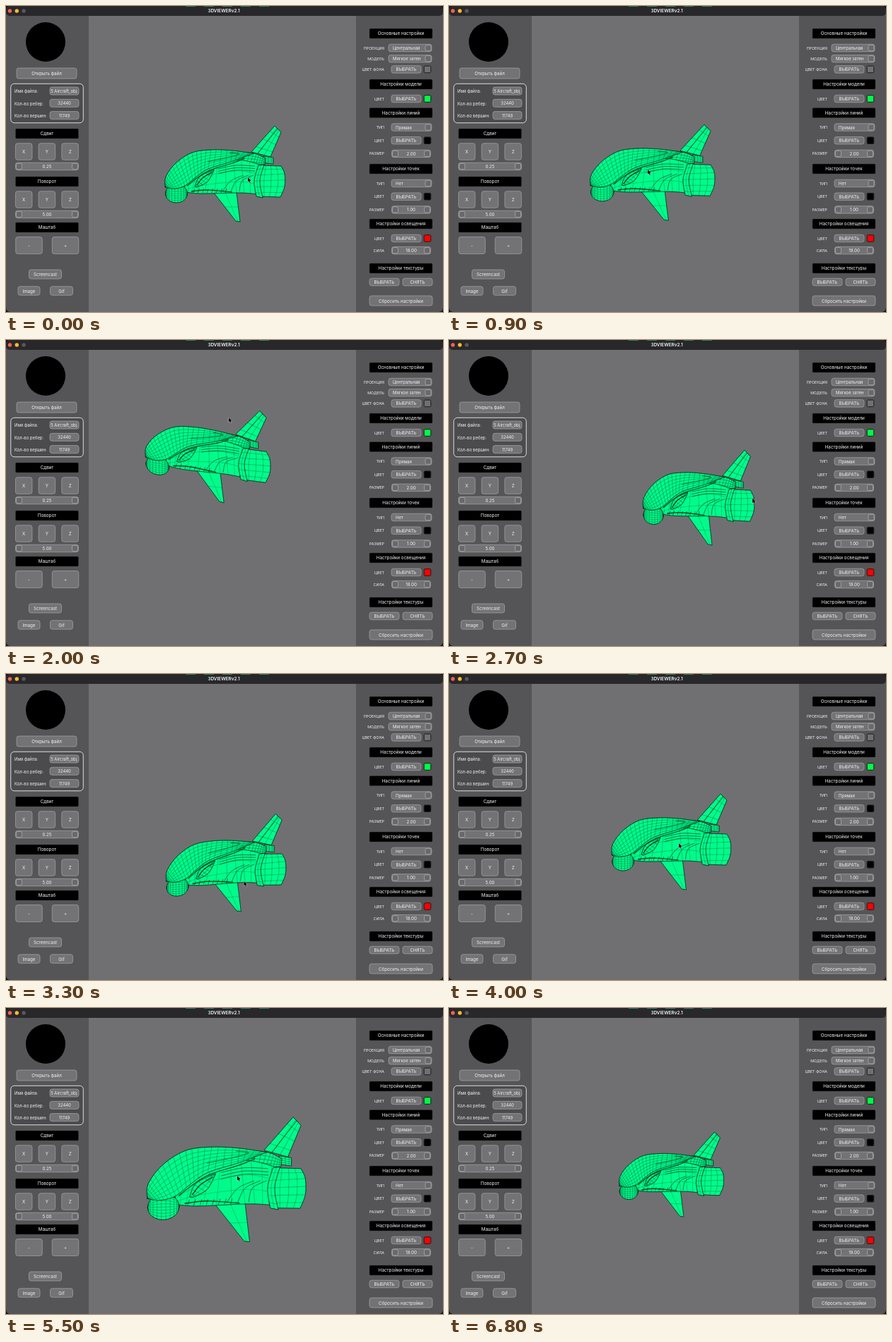
These frames come from a looping animation (618 by 434 pixels, 7.5 s). An HTML page with a canvas:

```html
<!DOCTYPE html>
<html lang="ru">
<head>
<meta charset="utf-8">
<title>3DVIEWERv2.1</title>
<style>
html, body { margin: 0; width: 100%; height: 100%; overflow: hidden; background: #111; }
svg, canvas { position: absolute; left: 0; top: 0; width: 618px; height: 434px; }
text { font-family: Inter, Roboto, sans-serif; fill: #f2f2f2; dominant-baseline: central; }
</style>
</head>
<body>
<svg id="ui" viewBox="0 0 618 434"></svg>
<canvas id="view"></canvas>
<script>
// ---- Window and panels: boxes are placed by their centre ----
const parts = [];
const box = (cx, cy, w, h, fill, stroke = 'none', r = 0, line = .7) => parts.push(
  `<rect x="${cx - w / 2}" y="${cy - h / 2}" width="${w}" height="${h}" rx="${r}" fill="${fill}" stroke="${stroke}" stroke-width="${line}"/>`);
const dot = (x, y, r, fill) => parts.push(`<circle cx="${x}" cy="${y}" r="${r}" fill="${fill}"/>`);
const text = (s, x, y, size = 6.3, anchor = 'middle', weight = 400) => parts.push(
  `<text x="${x}" y="${y}" font-size="${size}" text-anchor="${anchor}" font-weight="${weight}">${s}</text>`);

function button(s, cx, cy, w = 42, h = 10.5, size = 6.2) {
  box(cx, cy, w, h, '#737275', '#a6a5a8', 3);
  text(s, cx, cy, size);
}
function header(s, cx, cy) {
  box(cx, cy, 89, 14, '#000', '#39383a', 1.5, .5);
  text(s, cx, cy);
}
const knob = (cx, cy) => box(cx, cy, 8, 8.2, '#69686b', '#bdbcbf', 1.8, .6);
function spin(s, cx, cy, w = 55) {
  button(s, cx, cy, w);
  [-1, 1].forEach(side => knob(cx + side * (w / 2 - 5), cy));
}
function combo(s, cy, w) {
  const cx = 602 - w / 2;
  button('', cx, cy, w);
  text(s, cx - w / 2 + 6, cy, 6, 'start');
  knob(597, cy);
}
function swatch(cy, color) {
  button('ВЫБРАТЬ', 566, cy);
  box(596, cy, 9.6, 9.6, color, '#1c1c1d', 1.5, 1);
}

box(309, 217, 618, 434, '#555457', 'none', 6);
box(306, 224, 378, 420, '#707072');
box(309, 7, 618, 14, '#282729', 'none', 5);
['#ff5f57', '#febc2e', '#59585a'].forEach((color, i) => dot(5.5 + 9.8 * i, 7, 2.7, color));
text('3DVIEWERv2.1', 308, 7, 6.4, 'middle', 600);
parts.push('<path d="M254 .5H375" stroke="#2d7d5c" stroke-dasharray="14 12"/>');

dot(56, 51, 28, '#000');
button('Открыть файл', 57.5, 95.5, 85, 15);
box(58, 138, 102.5, 55.5, '#4b4a4c', '#dddcdf', 5, 1);
[['Имя файла:', '5 Aircraft_obj.'], ['Кол-во ребер:', '32440'], ['Кол-во вершин:', '11749']]
  .forEach(([name, value], i) => {
    text(name, 12, 120.5 + 17.7 * i, 5.9, 'start');
    button(value, 82.5, 120.5 + 17.3 * i, 41, 11, 5.9);
  });
[['Сдвиг', 181, '0.25'], ['Поворот', 249, '5.00']].forEach(([name, y, value]) => {
  header(name, 58, y);
  [...'XYZ'].forEach((axis, i) => button(axis, 25.2 + 32.7 * i, y + 25.5, 23.5, 23.5));
  spin(value, 58, y + 46.5, 89);
});
header('Маштаб', 58, 314);
[...'-+'].forEach((sign, i) => button(sign, 32.5 + 51.5 * i, 339.5, 37.5, 24));
button('Screencast', 55.5, 380.5, 46, 13);
button('Image', 32.5, 404, 31, 12.5);
button('Gif', 78.5, 404, 32, 12.5);

// Rows are [label, kind, value]
function section(title, y, rows, pitch = 18.7) {
  header(title, 558.5, y);
  rows.forEach(([label, kind, value], i) => {
    const cy = y + 20.5 + pitch * i;
    text(label, 535, cy, 5.3, 'end');
    kind(value, cy);
  });
}
const wide = (s, y) => combo(s, y, 61), narrow = (s, y) => combo(s, y, 57);
const color = (c, y) => swatch(y, c), number = (s, y) => spin(s, 573, y);
section('Основные настройки', 39, [['ПРОЕКЦИЯ', wide, 'Центральная'],
  ['МОДЕЛЬ', wide, 'Мягкое затен'], ['ЦВЕТ ФОНА', color, '#707072']], 15.2);
section('Настройки модели', 111, [['ЦВЕТ', color, '#00fa46']]);
section('Настройки линий', 151.5, [['ТИП', narrow, 'Прямая'], ['ЦВЕТ', color, '#000'], ['РАЗМЕР', number, '2.00']]);
section('Настройки точек', 231, [['ТИП', narrow, 'Нет'], ['ЦВЕТ', color, '#000'], ['РАЗМЕР', number, '1.00']]);
section('Настройки освещения', 309, [['ЦВЕТ', color, '#f00'], ['СИЛА', number, '18.00']], 17.2);
section('Настройки текстуры', 372, []);
button('ВЫБРАТЬ', 535, 391.5);
button('СНЯТЬ', 582, 391.5);
button('Сбросить настройки', 558.5, 418, 89, 14);
document.getElementById('ui').innerHTML = parts.join('');

// ---- Motion ----
const mix = (a, b, u) => a + (b - a) * u;
const ramp = (t, from, to) => Math.max(0, Math.min(1, (t - from) / (to - from)));
const range = n => Array.from({ length: n + 1 }, (_, i) => i / n);

// Catmull-Rom curve through a flat list of x, y
function curve(p, u) {
  const last = p.length / 2 - 1, i = Math.min(last - 1, Math.floor(u * last)), v = u * last - i;
  return [0, 1].map(axis => {
    const [a, b, c, d] = [-1, 0, 1, 2].map(o => p[2 * Math.max(0, Math.min(last, i + o)) + axis]);
    return b + .5 * v * (c - a + v * (2 * a - 5 * b + 4 * c - d + v * (3 * (b - c) + d - a)));
  });
}
// The drag, one point every 400 ms
const shiftPath = [0, 0, -14, -1, -34, -8, -36, -42, -21, -69, 14, -60, 40, 0, 10, 26, -20, 25, 4, 0, 4, 0];
const pointerPath = [342, 243, 295, 235, 245, 215, 262, 150, 315, 110, 385, 145, 432, 248, 360, 295, 275, 270, 325, 240, 327, 238];
const zoomAt = t => 1 + .83 * ramp(t, 4400, 4900) - .55 * ramp(t, 5200, 5500)
  - .28 * ramp(t, 5800, 6300) - .11 * ramp(t, 6400, 6800);

// ---- Model ----
const canvas = document.getElementById('view'), ctx = canvas.getContext('2d');
const dpr = window.devicePixelRatio || 1;
canvas.width = 618 * dpr;
canvas.height = 434 * dpr;

let shift, zoom;
// The nose lies nearer to the camera than the tail.
function project([x, y]) {
  const near = (385 - x) * .0015, k = zoom / (1 - zoom * near);
  return [306 + k * ((x - 306) * (1 - near) + shift[0]), 224 + k * ((y - 224) * (1 - near) + shift[1])];
}
const trace = pts => pts.forEach((p, i) => ctx[i ? 'lineTo' : 'moveTo'](...project(p)));
function stroke(width, ink) {
  ctx.lineWidth = width;
  ctx.strokeStyle = `rgba(0,25,12,${ink})`;
  ctx.stroke();
}

// Quad mesh between two edges
function mesh(a, b, across, down, ink = .55) {
  const at = (u, v) => {
    const p = curve(a, u), q = curve(b, u);
    return [mix(p[0], q[0], v), mix(p[1], q[1], v)];
  };
  const us = range(24);
  ctx.beginPath();
  trace([...us.map(u => at(u, 0)), ...us.map(u => at(1 - u, 1))]);
  ctx.closePath();
  ctx.fillStyle = '#00fb8b';
  ctx.fill();
  stroke(.7, .85);
  ctx.beginPath();
  range(across).forEach(u => trace([at(u, 0), at(u, 1)]));
  range(down).forEach(v => trace(us.map(u => at(u, v))));
  stroke(.5, ink);
}
function line(p, width = .7) {
  ctx.beginPath();
  trace(range(16).map(u => curve(p, u)));
  stroke(width, .8);
}
function ball(cx, cy, rx, ry) {
  const arc = side => range(8).flatMap(u =>
    [cx - rx * Math.cos(Math.PI * u), cy + side * ry * Math.sin(Math.PI * u)]);
  mesh(arc(-1), arc(1), 11, 8);
}

function drawShip() {
  // tail fin
  mesh([347, 207, 380, 170], [374, 214, 389, 179], 4, 3);
  line([356, 209, 384, 174], .9);
  // stub and rear deck
  mesh([364, 213, 378, 215], [364, 222, 378, 224], 4, 4);
  mesh([312, 206, 350, 209, 367, 216], [316, 224, 345, 225, 366, 225], 12, 4, .7);
  // lower fin
  mesh([294, 265, 325, 305], [326, 264, 331, 306], 2, 2, .4);
  // fuselage side with panel seams and vents
  mesh([252, 254, 285, 230, 325, 218, 363, 226], [254, 264, 277, 266, 330, 265, 357, 267], 11, 3, .4);
  range(2).forEach(u => line([300, 231 + 7 * u, 325, 226 + 7 * u, 352, 227 + 7 * u]));
  range(2).forEach(u => line([306 + 24 * u, 263, 318 + 16 * u, 248, 336 + 14 * u, 240]));
  line([262, 263, 285, 261, 320, 264], 1.4);
  range(7).forEach(u => line([mix(267, 312, u), 259, mix(265, 310, u), 265]));
  // engine and its front ring
  mesh([360, 226, 355, 248, 357, 270], [389, 227, 394, 238, 394, 256, 388, 271], 6, 4, .5);
  mesh([357, 226, 351, 248, 354, 270], [365, 225, 359, 248, 363, 272], 6, 2, .5);
  // nose and hull shell
  ball(241, 266, 15.6, 13);
  mesh([225, 257, 226, 242, 240, 223, 263, 208, 290, 204, 320, 205, 350, 209],
    [225, 257, 238, 259, 253, 255, 268, 243, 286, 231, 318, 221, 335, 215], 24, 7);
  line([256, 255, 270, 244, 288, 233, 320, 223, 337, 216], 1.2);
  line([285, 221, 309, 216, 330, 210, 316, 208]);
  // cockpit window
  mesh([267, 256, 274, 242, 294, 232], [270, 257, 285, 249, 294, 233], 7, 3, .7);
  line([270, 254, 278, 244, 291, 236], 1.3);
}

const arrow = new Path2D('M0 0V6.6L1.5 5.3L2.7 7.8L3.7 7.3L2.6 4.9L4.6 4.8Z');
function drawPointer(x, y) {
  ctx.translate(x, y);
  ctx.strokeStyle = '#ddd';
  ctx.lineWidth = .9;
  ctx.stroke(arrow);
  ctx.fillStyle = '#000';
  ctx.fill(arrow);
}

function draw(now) {
  // The picture advances ten times a second.
  const t = Math.floor(now % 7500 / 100) * 100, drag = ramp(t, 400, 4400);
  shift = curve(shiftPath, drag);
  zoom = zoomAt(t);
  ctx.setTransform(dpr, 0, 0, dpr, 0, 0);
  ctx.clearRect(0, 0, 618, 434);
  ctx.lineJoin = 'round';
  drawShip();
  if (t < 6500) drawPointer(...curve(pointerPath, drag));
  requestAnimationFrame(draw);
}
requestAnimationFrame(draw);
</script>
</body>
</html>
```
